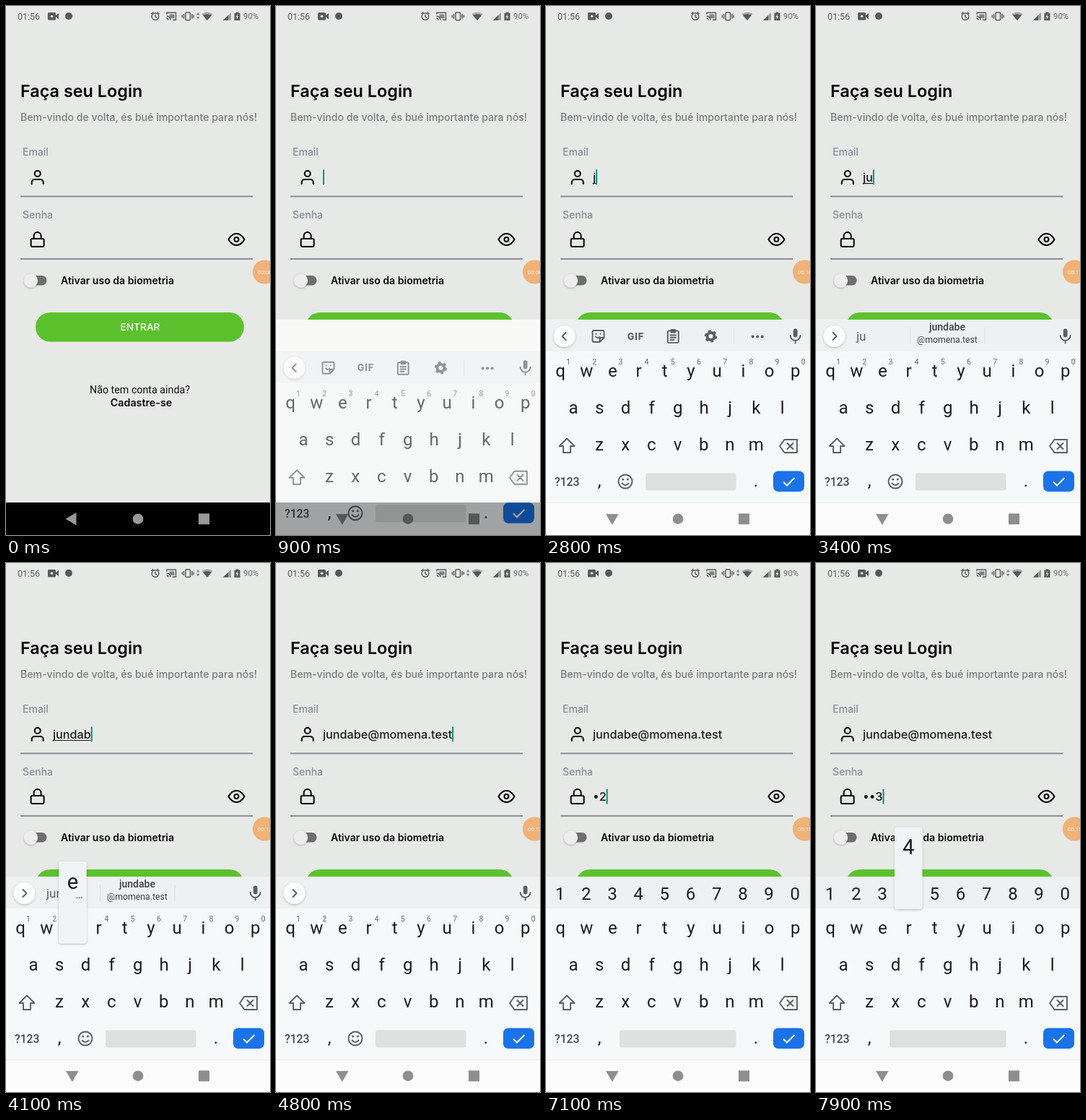
Animation, 366 px wide and 732 px high, one loop 8000 ms. Source, as an HTML page:

```html
<!DOCTYPE html>
<html lang="pt">
<head>
<meta charset="utf-8">
<title>Login</title>
<style>
html, body { margin: 0; width: 100%; height: 100%; overflow: hidden; background: #e7e9e7; }
svg { display: block; width: 100vw; height: 100vh; }
text { font-family: Inter, sans-serif; white-space: pre; }
.rb, .key { font-family: Roboto, sans-serif; }
.key { font-size: 24px; fill: #1b1c1d; text-anchor: middle; }
.hint { font-size: 10.5px; fill: #666; }
.line { fill: none; stroke: #000; stroke-width: 2; stroke-linecap: round; stroke-linejoin: round; }
.ico { fill: none; stroke: #5a5e62; stroke-width: 1.9; stroke-linecap: round; stroke-linejoin: round; }
.field { font-size: 16.2px; font-weight: 500; fill: #1c1c1c; }
.label { font-size: 14px; font-weight: 500; fill: #8b8d9a; }
</style>
</head>
<body>
<svg viewBox="0 0 366 732" xmlns="http://www.w3.org/2000/svg">
  <defs>
    <filter id="soft" x="-40%" y="-40%" width="180%" height="180%">
      <feDropShadow dx="0" dy="1" stdDeviation="1.4" flood-opacity=".28"/>
    </filter>
  </defs>
  <rect width="366" height="732" fill="#e7e9e7"/>

  <g id="status" fill="#58595a">
    <text class="rb" x="16" y="18.5" font-size="12.4">01:56</text>
    <rect x="58" y="9" width="11" height="10.5" rx="1.5"/>
    <path d="M68 14l5-4v8.500z"/><circle cx="63.500" cy="14.200" r="1.800" fill="#e7e9e7"/>
    <circle cx="87" cy="14" r="5"/>
    <g fill="none" stroke="#58595a" stroke-width="1.4">
      <circle cx="207" cy="14.500" r="4.800"/>
      <path d="M207 11.500v3.300l2 1.300M201.500 11l3-2.600M212.500 11l-3-2.600"/>
      <path d="M223 11.500V9.200h12.500v10H231M222.500 17a2.500 2.500 0 0 1 2.500 2.500M222.500 14a5.500 5.500 0 0 1 5.500 5.500"/>
      <rect x="249" y="9" width="6.500" height="10.500" rx="1"/>
      <path d="M246.500 11v6.500M244.300 12.500v3.500M258 11v6.500M260.200 12.500v3.500"/>
    </g>
    <rect x="226.500" y="11.500" width="7" height="5.500" opacity=".7"/>
    <g id="arrows" opacity=".75"><path d="M264 12.500l2.200-3.500 2.200 3.500z"/><path d="M264 15l2.200 3.500 2.200-3.500z"/></g>
    <path d="M271.500 11q7.500-5 15 0l-7.500 9z" opacity=".45"/><path d="M273 12.800q6-3 12 0l-6 7.200z"/>
    <path d="M301 19.800L312 9v10.800z" opacity=".55"/><path d="M301 19.800l7-6.900v6.900z"/>
    <path d="M316.500 10h2v-1.500h4V10h2v10h-8z"/>
    <path d="M321.300 11l-3 4.500h2l-.8 3.500 3-4.700h-2z" fill="#e7e9e7"/>
    <text class="rb" x="329" y="18" font-size="11.4" fill="#686a6b">90%</text>
  </g>

  <text x="20" y="126" font-size="23.4" font-weight="600" fill="#050505">Faça seu Login</text>
  <text x="20" y="158.500" font-size="14.1" font-weight="500" fill="#7b7c7c">Bem-vindo de volta, és bué importante para nós!</text>
  <text class="label" x="23" y="207">Email</text>
  <text class="label" x="23" y="293.500">Senha</text>
  <path d="M20 263.500h322M20 350h322" stroke="#8b8c9a" stroke-width="1.800"/>
  <g class="line">
    <g transform="translate(31.700 225)"><path d="M20 21v-2a4 4 0 0 0-4-4H8a4 4 0 0 0-4 4v2"/><circle cx="12" cy="7" r="4"/></g>
    <g transform="translate(31.600 311)"><rect x="3" y="11" width="18" height="11" rx="2"/><path d="M7 11V7a5 5 0 0 1 10 0v4"/></g>
    <g transform="translate(307.500 311)"><path d="M1 12s4-8 11-8 11 8 11 8-4 8-11 8-11-8-11-8z"/><circle cx="12" cy="12" r="3"/></g>
  </g>
  <text id="email" class="field" x="65" y="243"></text>
  <text id="senha" class="field" x="65" y="329.300"></text>
  <path id="under" stroke="#1c1c1c" stroke-width="1.200"/>
  <rect id="caret" width="2" height="20.500" fill="#0b8f82"/>

  <rect x="26" y="373" width="30.500" height="13.500" rx="6.700" fill="#6d6e6d"/>
  <circle cx="34.500" cy="380" r="9.600" fill="#ecedec" filter="url(#soft)"/>
  <text x="76" y="385" font-size="14.070" font-weight="600" fill="#080808">Ativar uso da biometria</text>
  <rect x="41" y="424" width="289" height="40.500" rx="20.200" fill="#5bc22d"/>
  <text x="186" y="449.200" font-size="13.700" font-weight="500" fill="#fff" text-anchor="middle">ENTRAR</text>
  <text class="rb" x="185.500" y="536" font-size="14.270" fill="#111" text-anchor="middle">Não tem conta ainda?</text>
  <text x="187.500" y="554" font-size="14.300" font-weight="600" fill="#080808" text-anchor="middle">Cadastre-se</text>

  <circle cx="358.500" cy="368" r="16.600" fill="#f1b278"/>
  <text id="timer" class="rb" x="349" y="371" font-size="7.800" fill="#fff" opacity=".8"></text>

  <rect id="base" y="434" width="366" height="253" fill="#f9faf8"/>
  <rect y="687" width="366" height="45"/>
  <g id="kb">
    <rect y="434" width="366" height="45" fill="#eef1f2"/>
    <rect y="478" width="366" height="210" fill="#f5f9f9"/>
    <rect y="687" width="366" height="45" fill="#fafbfa"/>
    <path d="M0 687.500h366" stroke="#eceeed"/>
    <g id="keys"></g>
    <g id="head">
      <circle cx="25.500" cy="457" r="15" fill="#fdfefe" filter="url(#soft)"/>
      <path id="chev" class="ico"/>
      <g fill="#5a5e62"><rect x="342.800" y="446.500" width="5.800" height="12" rx="2.900"/>
        <path class="ico" d="M338.800 456a6.900 6.900 0 0 0 13.800 0M345.700 463v3.500"/></g>
    </g>
    <g id="tools">
      <path class="ico" d="M66.500 449h12a2 2 0 0 1 2 2v8l-6 6h-8a2 2 0 0 1-2-2v-12a2 2 0 0 1 2-2zM74.500 465v-4a2 2 0 0 1 2-2h4M69 457.500q2.500 3 5.500.5M69.500 453.500v.2M75.500 453.500v.2"/>
      <text x="124.500" y="461.500" font-size="12.600" font-weight="800" letter-spacing="1" fill="#5a5e62" text-anchor="middle">GIF</text>
      <path class="ico" d="M170 449.500h12.500a1.200 1.200 0 0 1 1.200 1.200v14a1.200 1.200 0 0 1-1.200 1.200H170a1.200 1.200 0 0 1-1.200-1.200v-14a1.200 1.200 0 0 1 1.200-1.200zM173.500 448h5.500v3.500h-5.500zM172.500 455.500h7.500M172.500 458.700h7.500M172.500 462h5"/>
      <g fill="none" stroke="#5a5e62"><circle cx="228.500" cy="457" r="5" stroke-width="3.800"/>
        <circle cx="228.500" cy="457" r="7.400" stroke-width="2.600" stroke-dasharray="3.870"/></g>
      <path d="M260.500 446v22" stroke="#dde1e2"/>
      <g fill="#5a5e62"><circle cx="286.700" cy="457.500" r="2"/><circle cx="293.200" cy="457.500" r="2"/><circle cx="299.700" cy="457.500" r="2"/></g>
    </g>
    <g id="strip" fill="#3c4043">
      <text id="typed" class="rb" x="56" y="463" font-size="17" fill="#5a5e62"></text>
      <g id="guess">
        <path d="M130.500 445v23M234 445v23" stroke="#d8dcdd"/>
        <text id="guessA" class="rb" x="182" y="449" font-size="14" font-weight="500" text-anchor="middle"></text>
        <text id="guessB" class="rb" x="182" y="466" font-size="12.300" text-anchor="middle"></text>
      </g>
    </g>
    <path class="ico" d="M29 598.500l-10.500 10.500h5.500v9h10v-9h5.500z"/>
    <path class="ico" d="M330.500 600h17.500v18h-17.500l-6.500-9zM334.500 605l8 8M342.500 605l-8 8"/>
    <text class="rb" x="12" y="664" font-size="15.700" font-weight="500" fill="#46494c">?123</text>
    <text class="key" x="74" y="665">,</text>
    <text class="key" x="291" y="665">.</text>
    <rect id="space" y="646.500" height="24" rx="3" fill="#dfe1e0"/>
    <g id="smile"><circle class="ico" cx="110" cy="658" r="9.500"/>
      <path class="ico" d="M105.500 660.500q4.500 5 9 0"/><circle cx="106.700" cy="655" r="1.500" fill="#5a5e62"/><circle cx="113.300" cy="655" r="1.500" fill="#5a5e62"/></g>
    <rect x="315" y="643.500" width="43" height="28.500" rx="7" fill="#1a73e8"/>
    <path d="M329 658.500l5 5 10.500-10.500" fill="none" stroke="#fff" stroke-width="2"/>
  </g>

  <g id="nav"><path id="back"/><circle cx="183" cy="709.700" r="7.300"/><rect x="267" y="702.300" width="15" height="15"/></g>

  <g id="pop">
    <rect width="38.500" height="113.500" rx="4" fill="#f1f4f5" filter="url(#soft)"/>
    <text id="popKey" class="key" x="19.200" y="37.500" style="font-size:29px"></text>
    <text id="popDots" class="rb" x="23.500" y="50.500" font-size="14" fill="#222">…</text>
  </g>
</svg>
<script>
const NS = 'http://www.w3.org/2000/svg';
const $ = id => document.getElementById(id);
const LOOP = 8000, USER = 'jundabe', HOST = '@momena.test';

// key, press time, release time
const EMAIL = [['j', 2450, 2700], ['u', 2850, 3000], ['n', 3600, 3700], ['d', 3750, 3850],
  ['a', 3860, 3950], ['b', 3960, 4050], ['e', 4060, 4250]];
const PIN = [['1', 6500, 6700], ['2', 6900, 7100], ['3', 7300, 7600], ['4', 7800, 8100]];
const PRESSES = [...EMAIL, ...PIN];
const PICK = 4800, LEAVE = 5100, FOCUS = 5700, DIGITS = 5900;

const pos = {};
function set(e, attrs) {
  for (const k in attrs) e.setAttribute(k, attrs[k]);
}
function add(parent, cls, x, y, str) {
  const e = document.createElementNS(NS, 'text');
  set(e, { class: cls, x, y });
  e.textContent = str;
  parent.appendChild(e);
}
function group() {
  return $('keys').appendChild(document.createElementNS(NS, 'g'));
}
function show(id, on) {
  $(id).setAttribute('visibility', on ? 'visible' : 'hidden');
}
function write(id, str) {
  if ($(id).textContent !== str) $(id).textContent = str;
}

const letters = group(), hints = group(), numbers = group();
function row(parent, chars, x0, mid) {
  [...chars].forEach((c, i) => {
    const x = x0 + i * 36.2;
    pos[c] = [x, mid];
    add(parent, 'key', x, mid + 8.5, c);
  });
}
row(letters, 'qwertyuiop', 20, 504.5);
row(letters, 'asdfghjkl', 38, 555.5);
row(letters, 'zxcvbnm', 74, 606.5);
row(numbers, '1234567890', 19.5, 457);
[...'1234567890'].forEach((c, i) => add(hints, 'rb hint', 28 + i * 36.2, 496, c));
write('guessA', USER);
write('guessB', HOST);

const typedBy = (list, t) => list.filter(k => k[2] <= t).map(k => k[0]).join('');

function fields(t) {
  const name = typedBy(EMAIL, t), pin = typedBy(PIN, t);
  write('email', t >= PICK ? USER + HOST : name);
  write('senha', '•'.repeat(Math.max(0, pin.length - 1)) + pin.slice(-1));
  const onPin = t >= FOCUS;
  const field = $(onPin ? 'senha' : 'email');
  const width = field.textContent ? field.getComputedTextLength() : 0;
  set($('caret'), { x: 65 + width, y: onPin ? 313 : 226.5 });
  show('caret', (t >= 800 && t < 1100) || (t >= 1600 && t < LEAVE) ||
    (t >= FOCUS && t < 6150) || t >= 6250);
  const composing = name && t < PICK;
  show('under', composing);
  if (composing) set($('under'), { d: `M65 245.500h${width}` });
  write('typed', name);
}

function keyboard(t) {
  const p = Math.min(1, Math.max(0, (t - 800) / 300)), open = p > 0;
  show('base', open);
  set($('base'), { opacity: Math.min(1, p * 4) });
  set($('kb'), { transform: `translate(0 ${150 * (1 - p) ** 3})`, opacity: 1 - (1 - p) ** 2.6 });
  const g = Math.round(open ? 58 + 84 * p : 153);
  set($('nav'), { fill: `rgb(${g},${g},${g})` });
  set($('back'), { d: open ? 'M83 703h17.500l-8.700 15z' : 'M97.500 701v17.500l-15-8.700z' });

  const digits = t >= DIGITS, strip = t >= 2900 && !digits;
  numbers.setAttribute('display', digits ? 'inline' : 'none');
  hints.setAttribute('display', digits ? 'none' : 'inline');
  show('head', !digits);
  show('smile', !digits);
  show('tools', !digits && !strip);
  show('typed', strip && t < PICK);
  show('guess', strip && t >= 3200 && t < PICK);
  set($('chev'), { d: strip ? 'M23.500 452l5 5-5 5' : 'M27.500 452l-5 5 5 5' });
  set($('space'), digits ? { x: 102, width: 161.5 } : { x: 138, width: 125.5 });
}

function popup(t) {
  const k = PRESSES.find(k => t >= k[1] && t < k[2]);
  $('pop').setAttribute('display', k ? 'inline' : 'none');
  if (!k) return;
  const [x, y] = pos[k[0]];
  set($('pop'), { transform: `translate(${x - 19.2} ${y - 91.5})` });
  write('popKey', k[0]);
  $('popDots').setAttribute('display', 'aeiouyncs'.includes(k[0]) ? 'inline' : 'none');
}

function draw(t) {
  fields(t);
  keyboard(t);
  popup(t);
  write('timer', '00:' + String(8 + Math.floor(t / 1000)).padStart(2, '0'));
  show('arrows', t < 300 || t >= 3900);
}

const start = performance.now();
function tick() {
  draw((performance.now() - start) % LOOP);
  requestAnimationFrame(tick);
}
tick();
</script>
</body>
</html>
```
